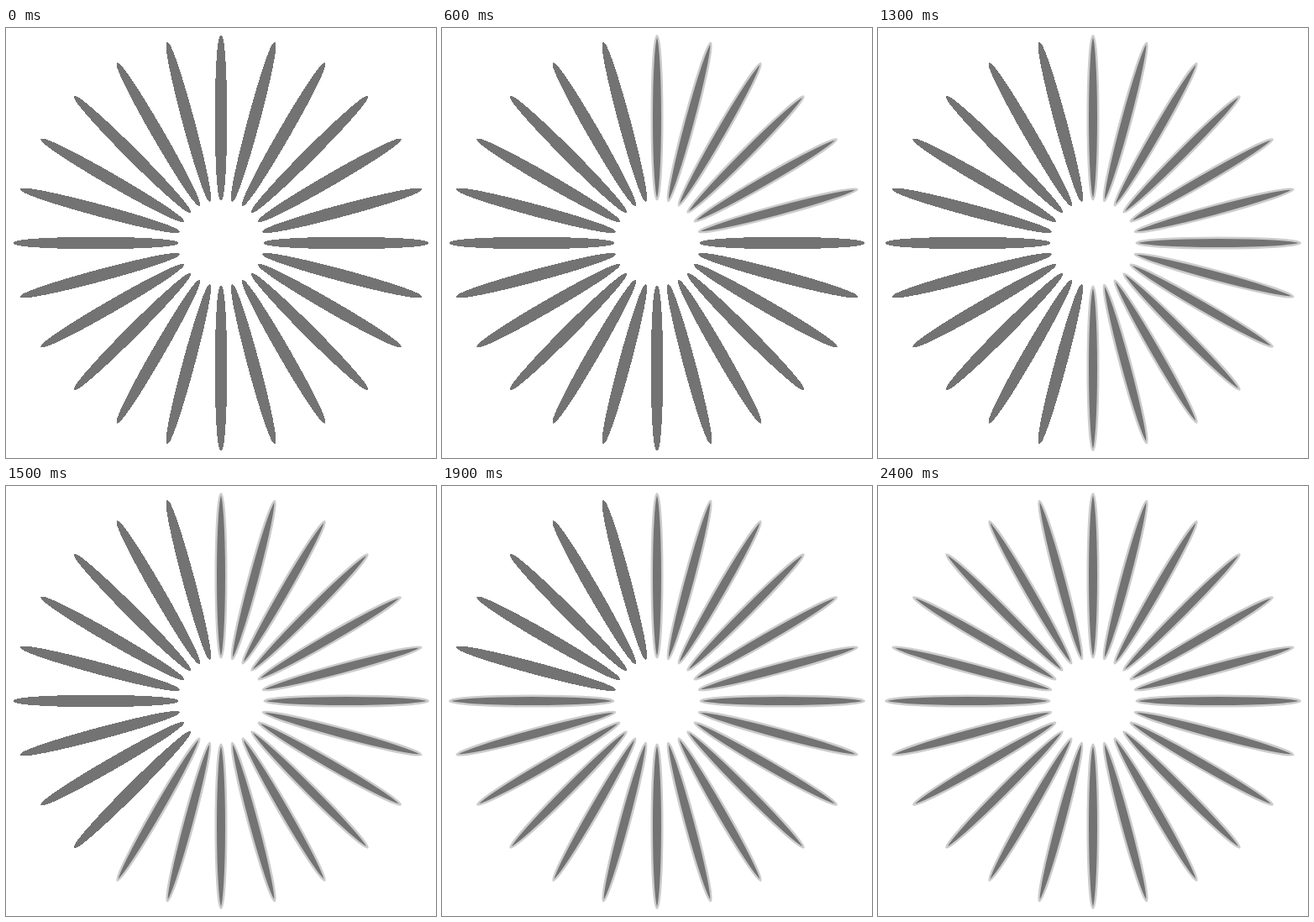
An HTML page for the animation above (2500 ms loop, 512 by 512 pixels).

```html
<!DOCTYPE html>
<html lang="en">
<head>
<meta charset="utf-8">
<title>Radial spokes</title>
<style>
  html, body { margin: 0; width: 100%; height: 100%; overflow: hidden; background: #fff; }
  svg { display: block; width: 100vw; height: 100vh; }
  ellipse { fill: #737373; stroke: #737373; stroke-width: 2; shape-rendering: crispEdges; }
  .lit { stroke: #ccc; stroke-width: 2.5; shape-rendering: auto; }
</style>
</head>
<body>
<svg viewBox="0 0 512 512"></svg>
<script>
  const COUNT = 24, STEP = 100;
  const svg = document.querySelector('svg');

  const spokes = Array.from({ length: COUNT }, (_, i) => {
    const spoke = document.createElementNS(svg.namespaceURI, 'ellipse');
    const attrs = { cx: 256, cy: 106.75, rx: 6.25, ry: 97.5, transform: `rotate(${i * 360 / COUNT} 256 256)` };
    for (const key in attrs) spoke.setAttribute(key, attrs[key]);
    return svg.appendChild(spoke);
  });

  // One more spoke is outlined each step, clockwise from the top; then all clear.
  const start = performance.now();
  function draw() {
    const lit = Math.floor((performance.now() - start) / STEP) % (COUNT + 1);
    spokes.forEach((spoke, i) => spoke.classList.toggle('lit', i < lit));
    requestAnimationFrame(draw);
  }
  draw();
</script>
</body>
</html>
```
